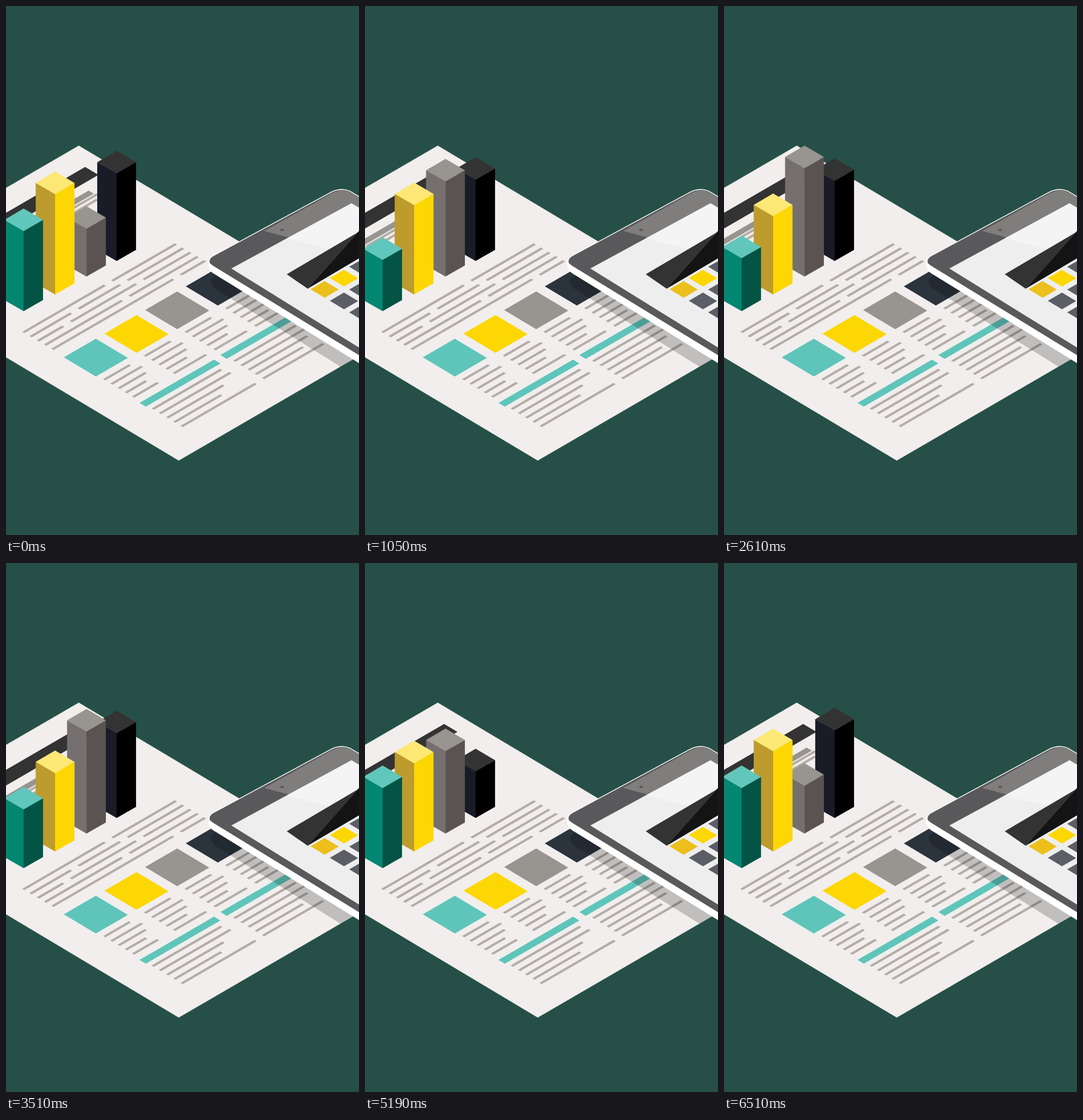
An HTML page that plays this animation: 611x917 px, repeating every 6.54 s.

```html
<!DOCTYPE html>
<html lang="en">
<head>
<meta charset="utf-8">
<title>Isometric report</title>
<style>
  html, body { margin: 0; width: 100%; height: 100%; overflow: hidden; background: #265047; }
  svg { display: block; width: 100%; height: 100%; }
</style>
</head>
<body>
<svg viewBox="0 0 611 917">
  <defs>
    <clipPath id="sheetClip"><path id="sheet" d="M126 242L674 570L299 788L-249 460Z"/></clipPath>
  </defs>

  <use href="#sheet" fill="#f1eeed"/>
  <g clip-path="url(#sheetClip)">
    <g id="print"></g>
    <path fill-opacity=".2" d="M400 440L356 472Q351 480 362 490L577 624L680 690V560Z"/>
  </g>

  <path fill="#fff" d="M350 446Q349 437 359 432L559 324Q577 313 595 320L640 347V637L358 463Q350 458 350 446Z"/>
  <path fill="#59595b" d="M353 446Q350 438 360 433L560 325Q577 315 594 321L640 349V623L358 450Z"/>
  <path fill="#807d7d" d="M447 390L560 327Q577 316 594 321L640 349V440L522 410Z"/>
  <path fill="#eee" d="M390 455L598 342L640 367V610Z"/>
  <path fill="#f4f4f4" d="M486 403L598 342L640 367V441Z"/>
  <path fill="#333" d="M486 465L640 374V420L522 490Z"/>
  <path fill="#141414" d="M611 390L640 373V420L522 490Z"/>
  <path fill="none" stroke="#555" stroke-width=".6" d="M523 489L611 390"/>
  <ellipse cx="478" cy="388" rx="3.5" ry="2" fill="#5d5a5b"/>
  <g id="icons"></g>
  <g id="bars"></g>
</svg>
<script>
const UP = 0.581, DOWN = 0.5985;   // slopes of the two ground axes
const LOOP = 6540, TICK = 30;
const TEAL = "#5fc5ba", YELLOW = "#fcd703", GRAY = "#98948f", SLATE = "#5c5e66";
const [print, icons, barLayer] = ["print", "icons", "bars"].map(id => document.getElementById(id));

function addPath(parent, fill, d = "") {
  const p = document.createElementNS("http://www.w3.org/2000/svg", "path");
  p.setAttribute("d", d);
  p.setAttribute("fill", fill);
  parent.append(p);
  return p;
}

// Flat rectangle on the ground; x, y is its left corner.
function slab(parent, fill, x, y, len, depth) {
  addPath(parent, fill,
    `M${x} ${y}l${len} ${-len * UP}l${depth} ${depth * DOWN}l${-len} ${len * UP}Z`);
}

function textLine(x, y, len) {
  slab(print, "#b4aca6", x, y - 2.3, len - 4, 4);
}

// Five lines whose lengths swing around mid; the last one is set apart.
function textBlock(x, y, mid, swing, peak, last) {
  for (let i = 0; i < 5; i++) {
    const len = i < 4 ? mid + swing * Math.cos(1.3 * (i - peak)) : last;
    textLine(x + i * 12.5, y + i * 7.5, len);
  }
}

// Heading
slab(print, "#333", -40, 381.8, 177, 23);
slab(print, GRAY, -40, 426.3, 183, 9);
for (const y of [418, 427]) textLine(0, y, 160);

// Paragraph, with the places where its lines break
[[145], [74, 159], [48, 174], [137], [213]].forEach((breaks, i) => {
  let from = 0;
  for (const to of [...breaks, 268]) {
    textLine(28 + i * 12.6 + from, 567 + i * 7.3 - from * UP, to - from);
    from = to + 9;
  }
});

// Coloured tiles with their captions
[TEAL, YELLOW, GRAY, "#2b333d"].forEach((fill, i) => {
  const dx = i * 70.4, dy = i * -41;
  slab(print, fill, 100 + dx, 609 + dy, 55.5, 55.5);
  textBlock(168 + dx, 649 + dy, 47, 10, 1.1, i ? 60 : 47);
});

// Two columns under teal rules
for (const x of [231, 371]) slab(print, TEAL, x, 688 - (x - 231) * 0.592, 129, 11);
textBlock(252, 700, 107, 22, 0.6, 132);
textBlock(393, 617, 103, 19, 0.9, 108);

// Grid of squares on the screen
for (let row = 0; row < 3; row++) {
  for (let col = 0; col < 3 - row; col++) {
    const fill = row || col > 1 ? SLATE : col ? YELLOW : "#ecbf1c";
    slab(icons, fill, 527 + 33.5 * (col + row), 491 + 33.5 * (row * DOWN - col * UP), 24.5, 24.5);
  }
}

// Bars, back to front; keys are [time, height of the top corner].
const HALF = 33.6;
const bars = [
  { x: 191.5, base: 442, colors: ["#191c27", "#000", "#333"],
    keys: [[0, 251], [1880, 270], [3860, 252.6], [5190, 322], [6510, 251]] },
  { x: 139.3, base: 469, colors: ["#75706f", "#5a5352", GRAY],
    keys: [[0, 347], [1680, 216], [1740, 216], [2970, 253], [4434, 253], [6510, 347]] },
  { x: 85, base: 500, colors: ["#bd9b2d", YELLOW, "#fde876"],
    keys: [[0, 287], [2110, 325], [4120, 325], [6510, 287]] },
  { x: 30.5, base: 529, colors: ["#038672", "#035445", "#61c6bb"],
    keys: [[0, 351], [1280, 412], [3510, 388], [5010, 351]] }
];
for (const bar of bars) bar.faces = bar.colors.map(c => addPath(barLayer, c));

function valueAt(keys, t) {
  const i = keys.findIndex(k => k[0] > t);
  if (i < 0) return keys[keys.length - 1][1];
  const [t0, a] = keys[i - 1], [t1, b] = keys[i];
  return a + (b - a) * (t - t0) / (t1 - t0);
}

function drawBar({ x, base, keys, faces }, t) {
  const top = Math.round(valueAt(keys, t));
  const mid = top + 19.7, front = top + 39.3, side = base - 19.3;
  const l = x - HALF, r = x + HALF;
  const shapes = [
    `M${l} ${mid}L${x} ${front - 1}H${x + 0.5}V${base}H${x}L${l} ${side}Z`,
    `M${x} ${front - 1}L${r} ${mid}V${side}L${x} ${base}Z`,
    `M${x} ${top}L${r} ${mid}L${x} ${front}L${l} ${mid}Z`
  ];
  shapes.forEach((d, i) => faces[i].setAttribute("d", d));
}

const start = performance.now();
function frame(now) {
  const t = Math.floor(Math.max(0, now - start) % LOOP / TICK) * TICK;
  bars.forEach(bar => drawBar(bar, t));
  requestAnimationFrame(frame);
}
frame(start);
</script>
</body>
</html>
```
